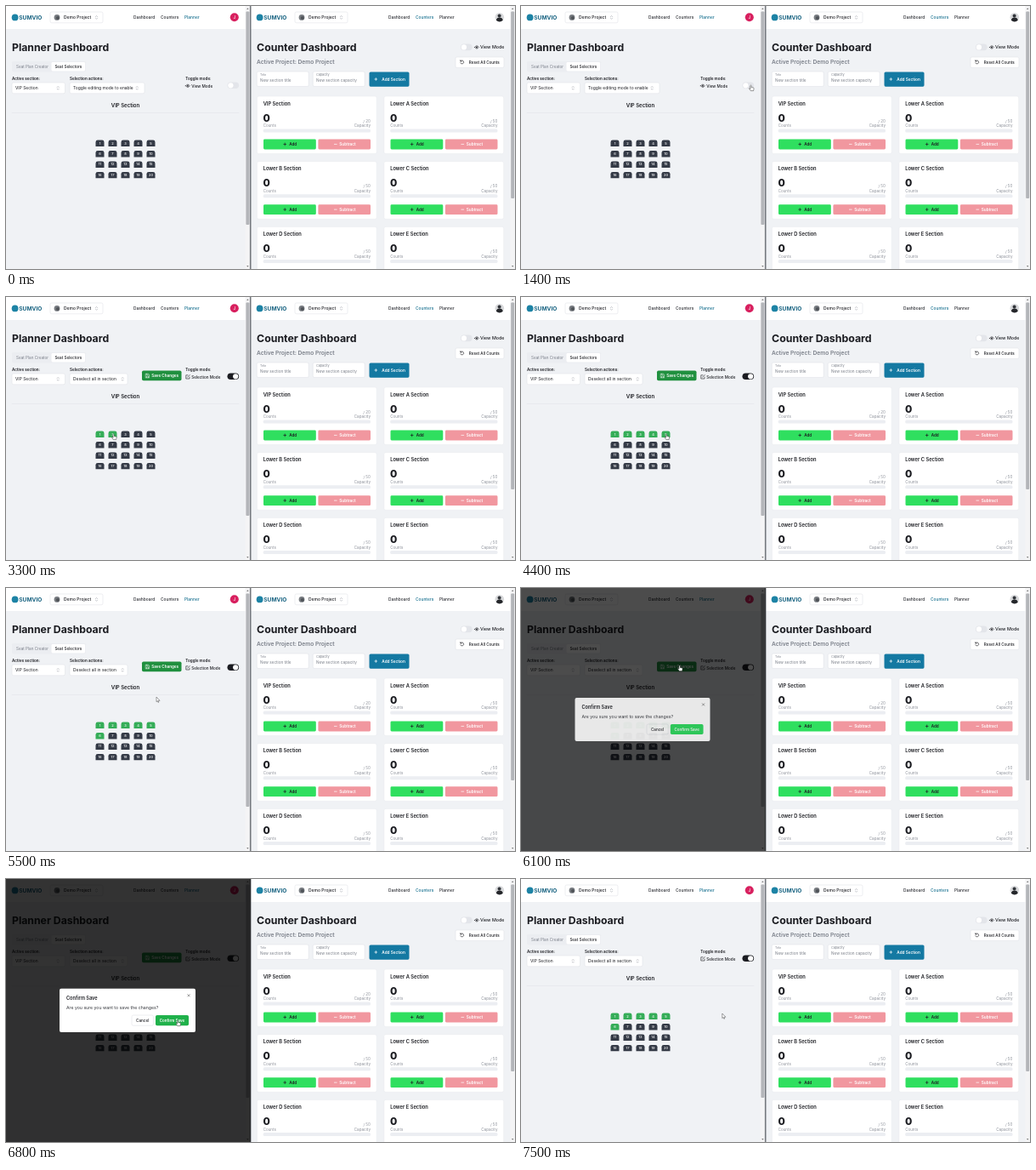
Animation of 599x309 px, one loop 8000 ms. Source, as an HTML page:

```html
<!DOCTYPE html>
<html lang="en">
<head>
<meta charset="utf-8">
<title>Planner and counter dashboards</title>
<style>
  html, body { margin: 0; width: 100%; height: 100%; overflow: hidden; background: #f0f2f5; }
  svg { display: block; width: 599px; height: 309px; }
  text { font-family: Inter, "Open Sans", sans-serif; white-space: pre; }
</style>
</head>
<body>
<svg id="stage" viewBox="0 0 599 309" xmlns="http://www.w3.org/2000/svg"></svg>
<script>
const INK = '#1b1c21', GREY = '#7a7f89', PALE = '#8d919a', LINE = '#e1e3e8', TEAL = '#17708f';
const LOOP = 8000, STEP = 100;

const rect = (x, y, w, h, fill, r = 0, extra = '') =>
  `<rect x="${x}" y="${y}" width="${w}" height="${h}" rx="${r}" fill="${fill}" ${extra}/>`;
const box = (x, y, w, h, r = 1.8) =>
  rect(x, y, w, h, '#fff', r, `stroke="${LINE}" stroke-width=".6"`);
const circle = (x, y, r, fill) => `<circle cx="${x}" cy="${y}" r="${r}" fill="${fill}"/>`;
const line = (d, color, w = .6, fill = 'none') =>
  `<path d="${d}" fill="${fill}" stroke="${color}" stroke-width="${w}" stroke-linecap="round" stroke-linejoin="round"/>`;
const text = (x, y, str, size, weight = 400, fill = INK, anchor = 'start') =>
  `<text x="${x}" y="${y}" font-size="${size}" font-weight="${weight}" fill="${fill}" text-anchor="${anchor}">${str}</text>`;
const group = (id, body) => `<g id="${id}">${body}</g>`;

const chevrons = (x, y) =>
  line(`M${x - 1.1} ${y - .8}l1.1 -1.1l1.1 1.1M${x - 1.1} ${y + .8}l1.1 1.1l1.1 -1.1`, '#8b8f98', .5);
const eye = (x, y) =>
  line(`M${x - 2.4} ${y}q2.4 -3.4 4.8 0q-2.4 3.4 -4.8 0z`, INK, .6) + circle(x, y, .9, INK);
const plus = (x, y, color) => line(`M${x - 1.4} ${y}h2.8M${x} ${y - 1.4}v2.8`, color, .7);
const toggle = (x, y, id = '') =>
  rect(x, y, 13.6, 7.6, '#e3e5ea', 3.8, id && `id="${id}Track"`) +
  `<circle ${id && `id="${id}Knob"`} cx="${x + 3.9}" cy="${y + 3.8}" r="3.1" fill="#fff"/>`;
const scrollbar = (x, w, thumbEnd) =>
  rect(x, 0, w, 309, '#f4f4f5') + rect(x + .8, 6.5, w - 1.6, thumbEnd - 6.5, '#b3b5b9', 1) +
  `<path d="M${x + w / 2 - 1.2} 4l1.2 -1.7l1.2 1.7zM${x + w / 2 - 1.2} 305l1.2 1.7l1.2 -1.7z" fill="#777"/>`;

function header(x, width, navX, active) {
  const nav = [['Dashboard', 0], ['Counters', 32], ['Planner', 60]];
  return rect(x, 0, width, 27, '#fff') +
    circle(x + 10.6, 13.4, 3.9, '#1d83a5') +
    text(x + 15.3, 15.9, 'SUMVIO', 6.6, 700, '#1b6583') +
    box(x + 52, 7, 62, 12.8) +
    circle(x + 60, 13.4, 3.4, '#777b80') + circle(x + 60.8, 14, 2, '#4f5358') +
    text(x + 68, 15.2, 'Demo Project', 5, 500) + chevrons(x + 106.5, 13.4) +
    nav.map(([s, dx]) => text(navX + dx, 15.2, s, 4.85, 500, s === active ? TEAL : '#2b2d33')).join('');
}

function seats() {
  let out = '';
  for (let i = 0; i < 20; i++) {
    const x = 110.5 + (i % 5) * 15, y = 161.2 + Math.floor(i / 5) * 12.45;
    out += `<path class="seat" d="M${x - 5} ${y + 3.8}v-5q0 -2.4 2.4 -2.4h5.2q2.4 0 2.4 2.4v5z"/>` +
      text(x, y + 1.3, i + 1, 4, 500, '#fff', 'middle');
  }
  return out;
}

function planner() {
  return rect(0, 0, 288, 309, '#f0f2f5') + header(0, 282, 150, 'Planner') +
    circle(268.8, 13.2, 5, '#d8205f') + text(268.8, 14.9, 'J', 4.8, 500, '#fff', 'middle') +
    text(7, 53, 'Planner Dashboard', 12.25, 700) +
    rect(7, 64.8, 87, 12.6, '#ebedf1', 1.8) + rect(53.5, 66, 39.6, 10.4, '#fff', 1.4) +
    text(12, 73, 'Seat Plan Creator', 4.6, 400, GREY) + text(57.4, 73, 'Seat Selectors', 4.6, 500) +
    text(7, 87, 'Active section:', 4.6, 600) + text(75, 87, 'Selection actions:', 4.6, 600) +
    box(7, 90, 62.5, 12.8) + text(11, 97.9, 'VIP Section', 4.9) + chevrons(61.2, 96.4) +
    group('viewMode',
      box(75, 90, 88, 12.8) + text(79, 97.9, 'Toggle editing mode to enable', 4.95) +
      chevrons(154.2, 96.4) + eye(213.9, 93.8) + text(218.2, 95.5, 'View Mode', 4.7, 500)) +
    group('selectMode',
      box(75, 90, 68, 12.8) + text(79, 97.9, 'Deselect all in section', 4.95) + chevrons(137.2, 96.4) +
      line('M214 91.8h-2.2v4.2h4.2v-2M213.5 94.3l2.8 -2.8', INK, .6) +
      text(218.2, 95.5, 'Selection Mode', 4.6, 500)) +
    group('saveButton',
      rect(160, 86.5, 46.5, 11.8, '#20903f', 1.8) +
      line('M164.6 90.2h3l1 1v3.6h-4zM165.5 94.6v-1.7h2v1.7M165.5 90.4v1h1.6', '#fff', .5) +
      text(171.3, 94, 'Save Changes', 4.6, 600, '#fff')) +
    text(211.3, 87, 'Toggle mode:', 4.6, 600) + toggle(260.5, 89.5, 'mode') +
    text(140.5, 118.8, 'VIP Section', 6, 600, INK, 'middle') +
    line('M7 125.5H274', '#e2e4e9', .6) + seats() + scrollbar(281.6, 5.6, 257);
}

function card(x, y, name, capacity) {
  return rect(x, y, 140.8, 67.6, '#fff', 2, 'stroke="#e6e8ec" stroke-width=".5"') +
    text(x + 7.3, y + 10.5, name, 5.75, 600) +
    text(x + 7.1, y + 29.7, '0', 12, 800) +
    text(x + 7.3, y + 36.3, 'Counts', 4.5, 400, PALE) +
    text(x + 133.6, y + 30.6, '/ ' + capacity, 4.6, 400, PALE, 'end') +
    text(x + 133.6, y + 36.3, 'Capacity', 4.6, 400, PALE, 'end') +
    rect(x + 7.3, y + 38.6, 126.3, 4, '#eceef2', 1.6) +
    rect(x + 7.6, y + 50.6, 61.8, 11.8, '#2fdf5f', 1.4) + plus(x + 32.8, y + 56.4, INK) +
    text(x + 37.8, y + 58.1, 'Add', 4.6, 600) +
    rect(x + 72, y + 50.6, 61.6, 11.8, '#f1979f', 1.4) +
    line(`M${x + 91} ${y + 56.4}h2.8`, '#fff', .7) +
    text(x + 96.9, y + 58.1, 'Subtract', 4.7, 600, '#fff');
}

function counter() {
  const names = ['VIP', 'Lower A', 'Lower B', 'Lower C', 'Lower D', 'Lower E'];
  return rect(288, 0, 311, 309, '#f0f2f5') + header(288, 306, 450, 'Counters') +
    circle(580.8, 13.3, 5.3, '#d9dadc') + circle(580.6, 11.5, 2, '#33363b') +
    `<path d="M576.8 16.8q.6 -3.4 4 -3.4t4 3.4q-4 3.4 -8 0z" fill="#24262a"/>` +
    text(295, 53, 'Counter Dashboard', 12.35, 700) +
    text(295, 68.4, 'Active Project: Demo Project', 6.65, 600, GREY) +
    toggle(535, 44.6) + eye(554, 48.4) + text(558, 50.3, 'View Mode', 5.3, 500) +
    box(529, 60, 57, 12.6) +
    line('M535 64.8a2 2 0 1 1 -.2 2M534.8 63.5v1.5h1.5', INK, .6) +
    text(544.8, 67.9, 'Reset All Counts', 4.6, 500) +
    box(295.2, 77, 61, 17.6) + text(299, 82, 'Title', 3.4, 400, GREY) +
    text(299, 89.2, 'New section title', 4.65, 400, GREY) +
    box(361.2, 77, 61, 17.6) + text(365, 82, 'Capacity', 3.7, 400, GREY) +
    text(365, 89.2, 'New section capacity', 4.7, 400, GREY) +
    rect(427.5, 77.5, 47, 17.2, '#1479a2', 1.6) + plus(435.3, 86, '#fff') +
    text(442.3, 87.8, 'Add Section', 4.7, 600, '#fff') +
    names.map((n, i) => card(295.4 + (i % 2) * 149.5, 106 + Math.floor(i / 2) * 76.7,
      n + ' Section', i ? 50 : 20)).join('') +
    scrollbar(593.4, 5.6, 226);
}

const dialog = () =>
  rect(63, 128.8, 160, 51.3, '#fff', 2) +
  text(71, 141.5, 'Confirm Save', 5.6, 600) +
  line('M213.8 135.6l2.4 2.4M216.2 135.6l-2.4 2.4', '#555', .6) +
  text(71, 152.8, 'Are you sure you want to save the changes?', 5.2, 400, '#34363c') +
  box(148, 160, 25.4, 12.2) + text(160.7, 167.8, 'Cancel', 4.6, 500, INK, 'middle') +
  rect(176, 160, 39, 12.2, '#2bd85c', 1.8, 'id="confirm"') +
  text(195.5, 167.8, 'Confirm Save', 4.5, 600, '#fff', 'middle');

const cursor = () =>
  group('arrow', line('M0 0v5.2l1.2 -1.1l.9 1.9l.8 -.4l-.8 -1.8h1.6z', '#333', .45, '#fff')) +
  group('hand', line('M-.6 .5q.6 -.9 1.2 0v2l2.4 .5q.7 .2 .6 1l-.5 2.6h-3.3l-1.9 -2.7q.3 -.9 1.5 .1z', '#222', .45, '#fff'));

const stage = document.getElementById('stage');
stage.innerHTML = planner() + counter() + rect(286.9, 0, 1.6, 309, '#73777d') +
  rect(0, 0, 287.8, 309, '#000', 0, 'id="shade"') +
  group('dialog', dialog()) + group('cursor', cursor());

const el = id => document.getElementById(id);
const seatNodes = [...document.querySelectorAll('.seat')];
const show = (id, on) => el(id).setAttribute('display', on ? 'inline' : 'none');
const clamp = v => Math.max(0, Math.min(1, v));

const TOGGLED = 1600, OPENED = 6000, CONFIRM_HOVER = 6550, CLOSED = 6950;
const seatClicks = [2700, 3200, 3600, 3900, 4300, 4900];
const handSpans = [[1100, 1800], [2400, 5200], [5700, 6150], [CONFIRM_HOVER, CLOSED]];
const cursorPath = [
  [500, 282, 205], [1200, 270.5, 93], [1700, 270.5, 93], [2500, 111, 161], [2800, 111, 161],
  [3100, 126.5, 161], [3300, 126.5, 161], [3550, 141, 161], [3650, 141, 161], [3850, 156, 161],
  [3950, 156, 161], [4200, 171, 161], [4400, 171, 161], [4800, 111, 173.5], [5050, 111, 173.5],
  [5500, 177, 128.5], [5800, 186.5, 91], [6150, 186.5, 91], [6600, 202, 166], [7000, 202, 166],
  [7300, 235, 158], [7500, 236.8, 158.4], [LOOP, 236.8, 158.4]
];

function cursorAt(t) {
  const i = Math.max(1, cursorPath.findIndex(p => p[0] >= t));
  const [t0, x0, y0] = cursorPath[i - 1], [t1, x1, y1] = cursorPath[i];
  const k = clamp((t - t0) / (t1 - t0)), e = k * k * (3 - 2 * k);
  return [x0 + (x1 - x0) * e, y0 + (y1 - y0) * e];
}

function draw(t) {
  const editing = t >= TOGGLED;
  show('viewMode', !editing);
  show('selectMode', editing);
  show('saveButton', t >= seatClicks[0] && t < CLOSED + 150);
  el('modeTrack').setAttribute('fill', editing ? INK : '#e3e5ea');
  el('modeKnob').setAttribute('cx', 264.4 + 5.8 * clamp((t - TOGGLED + 75) / 150));
  seatNodes.forEach((s, i) => s.setAttribute('fill', t >= seatClicks[i] ? '#35ad58' : '#343a46'));

  const opening = 1 - (1 - clamp((t - OPENED) / 200)) ** 3;
  const open = opening * (1 - clamp((t - CLOSED) / 200));
  el('shade').setAttribute('opacity', .8 * open);
  el('dialog').setAttribute('opacity', open);
  const scale = .95 + .05 * open;
  el('dialog').setAttribute('transform', `translate(143 154.5) scale(${scale}) translate(-143 -154.5)`);
  el('confirm').setAttribute('fill', t >= CONFIRM_HOVER ? '#20b14b' : '#2bd85c');
  show('dialog', open > 0);

  const hand = handSpans.some(([a, b]) => t >= a && t < b);
  show('cursor', t >= cursorPath[0][0]);
  show('hand', hand);
  show('arrow', !hand);
  el('cursor').setAttribute('transform', `translate(${cursorAt(t)})`);
}

const start = performance.now();
function tick() {
  const t = (performance.now() - start) % LOOP;
  draw(Math.floor(t / STEP) * STEP);
  requestAnimationFrame(tick);
}
tick();
</script>
</body>
</html>
```
